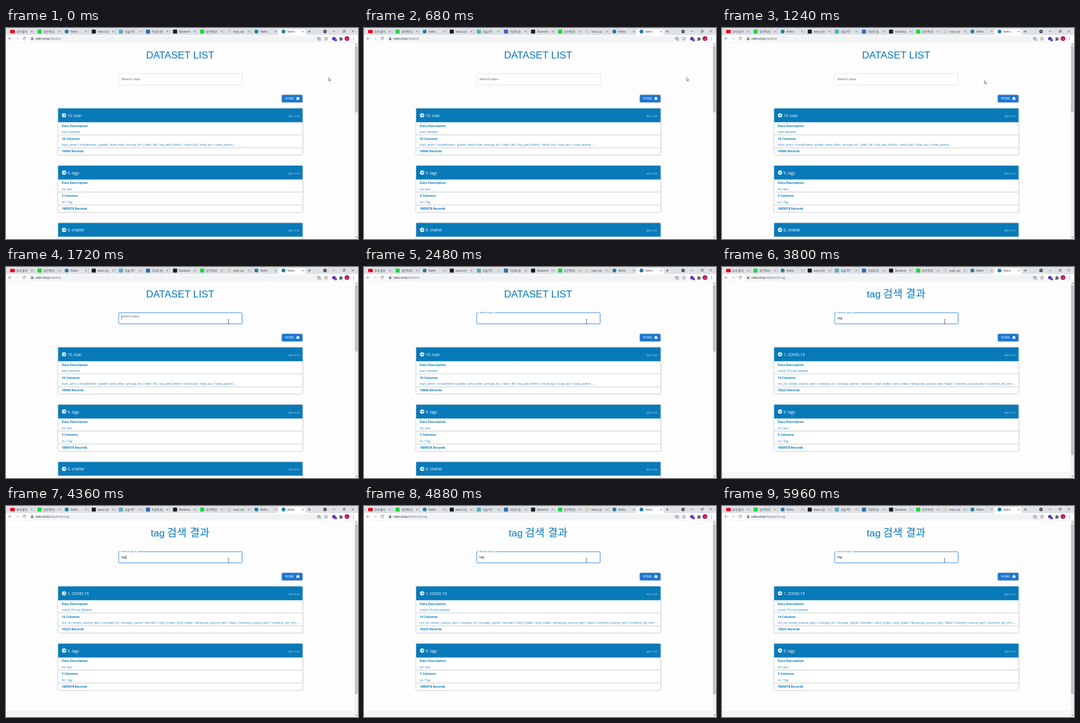
Recreate the animation shown at these times as an HTML page. Size 600 by 360 pixels, loop 6000 ms.

```html
<!DOCTYPE html>
<html lang="ko">
<head>
<meta charset="utf-8">
<style>
  html, body { margin: 0; width: 100%; height: 100%; overflow: hidden; background: #fdfdfd; }
  svg { display: block; width: 600px; height: 360px; }
  text { font-family: "Open Sans", "Noto Sans CJK KR", "Noto Sans CJK", sans-serif; white-space: pre; }
  .arial { font-family: "Liberation Sans", Arial, "Noto Sans CJK KR", "Noto Sans CJK", sans-serif; }
  .lift { filter: drop-shadow(0 .7px .8px rgba(0, 0, 0, .45)); }
</style>
</head>
<body>
<svg id="stage" viewBox="0 0 600 360"></svg>
<script>
const LOOP = 6000;
const FOCUS = 1702;
const KEYS = [2700, 2860, 3020];
const RESULTS = 3500;
const BLINK = 530;
const BLUE = '#087ab9';
const QUERY = 'tag';

const rect = (x, y, w, h, fill, extra = '') =>
  `<rect x="${x}" y="${y}" width="${w}" height="${h}" fill="${fill}" ${extra}/>`;
const circle = (x, y, r, fill, extra = '') =>
  `<circle cx="${x}" cy="${y}" r="${r}" fill="${fill}" ${extra}/>`;
const line = (d, color = '#5f6368', w = .7, extra = '') =>
  `<path d="${d}" fill="none" stroke="${color}" stroke-width="${w}" ${extra}/>`;
const shape = (d, fill, extra = '') => `<path d="${d}" fill="${fill}" ${extra}/>`;
const text = (x, y, size, fill, str, extra = '') =>
  `<text x="${x}" y="${y}" font-size="${size}" fill="${fill}" ${extra}>${str}</text>`;

const square = color => x => rect(x - 3.5, 2.8, 7, 6.6, color, 'rx=".8"');
const globe = x => circle(x, 6, 3.3, '#247f9f');
const TABS = [
  ['추석 맞이!', x => rect(x - 4, 3.3, 8, 5.6, '#f00018', 'rx="1.4"')],
  ['받은쪽지함', square('#20d43c')],
  ['NeKiv', globe],
  ['exec/시연시', square('#181c20')],
  ['자율 PJT 공', square('#55aec2')],
  ['이상치 탐지', square('#2d6cab')],
  ['Backend(ser', square('#181c20')],
  ['받은쪽지함', square('#20d43c')],
  ['read_sql 공', square('#d9d3c4')],
  ['NeKiv', globe],
  ['NeKiv', globe],
];

function tab([label, icon], i) {
  const x = 3 + 46.2 * i, active = i === TABS.length - 1;
  const close = x + 41;
  const clip = `<clipPath id="tab${i}"><rect x="${x}" y="0" width="33.5" height="12"/></clipPath>`;
  return (active
      ? shape(`M${x - 3} 12Q${x - .5} 12 ${x - .5} 9.5V4.5Q${x - .5} 2 ${x + 2} 2H${x + 43}Q${x + 45.5} 2 ${x + 45.5} 4.5V9.5Q${x + 45.5} 12 ${x + 48} 12Z`, '#fff')
      : i < TABS.length - 2 ? line(`M${x + 45} 3V9.5`, '#9a9da2', .5) : '')
    + clip + icon(x + 8)
    + text(x + 14.7, 8, 4.7, '#3c4043', label, `clip-path="url(#tab${i})"`)
    + line(`M${close - 1.4} 4.6l2.8 2.8m0 -2.8l-2.8 2.8`, '#4c5055', .6);
}

function browserBar() {
  return rect(0, 0, 600, 12, '#dee1e6') + TABS.map(tab).join('')
    + line('M514.5 6h5M517 3.5v5', '#3c4043')
    + circle(543.8, 5.8, 2.9, '#34373a') + shape('M542.3 5l1.5 1.8 1.5 -1.8z', '#fff')
    + line('M557 5.8h4', '#333', .6)
    + line('M574.5 4.7h2.8v2.8h-2.8zM575.4 4.7v-1h2.8v2.8h-.9', '#333', .5)
    + line('M589.3 3.7l3.8 3.8m0 -3.8l-3.8 3.8', '#333', .6)
    + rect(0, 12, 600, 12, '#fff')
    + line('M9.7 18H4.6m2.3 -2.3L4.6 18l2.3 2.3')
    + line('M16.2 18h5.1m-2.3 -2.3l2.3 2.3l-2.3 2.3', '#b8babd')
    + line('M32.6 16.4a2.3 2.3 0 1 0 .5 2.2') + shape('M33.3 15v2.4h-2.4z', '#5f6368')
    + rect(38.5, 13.4, 512, 9.6, '#f1f3f4', 'rx="4.8"')
    + rect(42.8, 17.4, 3.6, 2.9, '#5f6368', 'rx=".4"') + line('M43.6 17.4v-1a1 1 0 0 1 2 0v1', '#5f6368', .6)
    + `<text x="50" y="19.9" font-size="4.85" fill="#202124">nekiv.shop<tspan id="path" fill="#6b6f74"></tspan></text>`
    + line('M531 16h3v4h-3zM533.5 17.4h2.6v4h-2.6', '#5f6368', .6) + text(531.4, 19, 2.6, '#5f6368', 'G')
    + line('M545.5 15.4l.8 1.8 2 .2-1.5 1.3.5 2-1.8-1-1.8 1 .5-2-1.5-1.3 2-.2z', '#5f6368', .55)
    + shape('M559 15l3 1.5v3.4l-3 1.6-3-1.6v-3.4z', '#6733b9') + rect(560, 18.7, 4, 3.8, '#4b35c9', 'rx=".8"')
    + text(561.1, 21.7, 3, '#fff', '1')
    + shape('M568 16.5h1.5a1.1 1.1 0 0 1 2.2 0h1.5v1.6a1 1 0 0 1 0 2v1.4H568v-1.5a1 1 0 0 0 0 -2z', '#5f6368')
    + circle(581.2, 18, 4, '#c2185b') + text(581.2, 19.5, 4.2, '#fff', 's', 'text-anchor="middle"')
    + [15.8, 18, 20.2].map(y => circle(592.5, y, .6, '#5f6368')).join('')
    + line('M0 24.2h600', '#dcdee1', .5);
}

function scrollbar(bottom) {
  return rect(594.4, 24.5, 5.6, 335.5, '#f1f1f1')
    + rect(594.9, 31, 4.7, bottom - 31, '#c1c1c1')
    + shape('M597.2 26.8l1.5 1.8h-3z', '#555') + shape('M597.2 358l1.5 -1.8h-3z', '#555');
}

function card(top, title, about, columnCount, columns, records) {
  const x = 89, w = 416.5;
  const row = (dy, str, bold) =>
    text(95, top + dy, bold ? 5.3 : 5.33, bold ? BLUE : '#1d81be', str, bold ? 'font-weight="700"' : '');
  const divider = dy => rect(x, top + dy, w, .8, '#bdc0c2') + rect(x, top + dy + .8, w, .6, '#e6e7e8');
  return `<g class="lift">${rect(x, top, w, 79, '#fff', 'rx="1"')}</g>`
    + shape(`M${x} ${top + 23.4}V${top + 1}q0 -1 1 -1h${w - 2}q1 0 1 1v22.4z`, BLUE)
    + circle(99, top + 11.7, 3.6, '#fff')
    + line(`M96.8 ${top + 11.7}h4.2m-1.9 -2l2 2l-2 2`, BLUE, .9)
    + text(105, top + 14.5, 6.5, '#fff', title)
    + text(481.5, top + 14.5, 3.45, '#fff', '2021-11-18')
    + row(31.4, 'Data Description', true) + row(41.7, about)
    + divider(44.5) + row(53.2, columnCount + ' Columns', true) + row(63.6, columns)
    + divider(66.6) + row(75.1, records + ' Records', true);
}

const tagsCard = card(235, '9. tags', 'for text', 3, 'Id / Tag', 1885078);
const join = names => names.split(' ').join(' / ') + ' ...';

const listPage = text(296.8, 52, 17, BLUE, 'DATASET LIST', 'class="arial" text-anchor="middle"')
  + card(137.3, '10. loan', 'loan dataset', 16,
      join('loan_amnt installment grade emp_title annual_inc title dti inq_last_6mths revol_bal total_acc total_pymnt'), 10000)
  + tagsCard
  + card(332.7, '6. chatter', '', '', '', '')
  + scrollbar(144);

const resultPage = `<text class="arial" y="52" font-size="17" fill="${BLUE}"><tspan x="246.8">tag</tspan>`
  + `<tspan x="274.6" font-size="18">검색</tspan><tspan x="313.6" font-size="18">결과</tspan></text>`
  + card(137.3, '1. COVID-19', 'covid-19 trial dataset', 14,
      join('nct_id entity_source_text concept_id concept_name domain start_index end_index temporal_source_text days numeric_source_text numeric_att_min'), 10223)
  + tagsCard
  + rect(0, 349, 594.4, 11, '#f6f6f6')
  + scrollbar(321);

const searchBox = rect(192, 78, 210.5, 19, '#fff', 'id="box" rx="1.6"')
  + rect(195.3, 76.5, 0, 3, '#fdfdfd', 'id="notch"')
  + text(0, 0, 5.75, '#666', 'Search input', 'id="label" class="arial"')
  + text(196.8, 89.2, 5.75, '#222', '', 'id="typed" class="arial"')
  + rect(196.8, 84, .5, 7, '#222', 'id="caret"');

const homeButton = `<g class="lift">${rect(470.3, 114.2, 35, 12.5, '#1976d2', 'rx="1.5"')}</g>`
  + text(475.6, 122.3, 5, '#fff', 'HOME', 'class="arial" letter-spacing=".12"')
  + shape('M497.6 117.3l3.3 3h-1v2.8h-1.6v-2h-1.4v2h-1.6v-2.8h-1z', '#fff');

const pointers = `<g id="arrow">${shape('M0 0v5.6l1.3-1.2.9 2 .9-.4-.9-1.9h1.8z', '#fff', 'stroke="#222" stroke-width=".5"')}</g>`
  + `<g id="beam">${line('M-1.3 -3.2q1.3 0 1.3 .8q0 -.8 1.3 -.8M0 -2.6v5.2M-1.3 3.2q1.3 0 1.3 -.8q0 .8 1.3 .8', '#222', .6)}</g>`;

document.getElementById('stage').innerHTML = rect(0, 0, 600, 360, '#fdfdfd')
  + `<g id="list">${listPage}</g><g id="results">${resultPage}</g>`
  + searchBox + homeButton + browserBar() + pointers;

const el = id => document.getElementById(id);
const set = (id, attrs) => Object.entries(attrs).forEach(([k, v]) => el(id).setAttribute(k, v));
const show = (id, on) => set(id, { visibility: on ? 'visible' : 'hidden' });
const clamp = v => Math.min(1, Math.max(0, v));
const mix = (a, b, p) => a + (b - a) * p;

// cubic-bezier(0, 0, .2, 1), solved by bisection
function easeOut(x) {
  let lo = 0, hi = 1;
  for (let i = 0; i < 20; i++) {
    const s = (lo + hi) / 2;
    if (.6 * (1 - s) * s * s + s ** 3 < x) lo = s; else hi = s;
  }
  return 3 * (1 - lo) * lo * lo + lo ** 3;
}

function draw(t) {
  const focused = t >= FOCUS, found = t >= RESULTS;
  show('list', !found);
  show('results', found);
  el('path').textContent = found ? '/datalist?q=' + QUERY : '/datalist/';

  const p = easeOut(clamp((t - FOCUS) / 200));
  const rgb = [[102, 25], [102, 118], [102, 210]].map(([a, b]) => Math.round(mix(a, b, p)));
  set('box', { stroke: focused ? '#1976d2' : '#c8c8c8', 'stroke-width': focused ? .85 : .5 });
  set('notch', { width: 28 * easeOut(clamp((t - FOCUS - 50) / 100)) });
  set('label', {
    transform: `translate(${mix(196.5, 196.9, p)} ${mix(89.2, 78.8, p)}) scale(${mix(1, .75, p)})`,
    fill: `rgb(${rgb})`,
  });

  const pressed = KEYS.filter(k => t >= k);
  el('typed').textContent = QUERY.slice(0, pressed.length);
  const lastInput = pressed.length ? pressed[pressed.length - 1] : FOCUS;
  show('caret', focused && Math.floor((t - lastInput) / BLINK) % 2 === 0);
  set('caret', { x: 196.8 + (pressed.length ? el('typed').getComputedTextLength() : 0) });

  const m = clamp((t - 900) / 600), glide = m * m * (3 - 2 * m);
  const x = mix(549.8, 379.3, glide), y = mix(84.3, 92.8, glide);
  const overBox = x < 402.5;
  show('arrow', !overBox);
  show('beam', overBox);
  set(overBox ? 'beam' : 'arrow', { transform: `translate(${x} ${y})` });
}

const start = performance.now();
function tick() {
  draw((performance.now() - start) % LOOP);
  requestAnimationFrame(tick);
}
tick();
</script>
</body>
</html>
```
